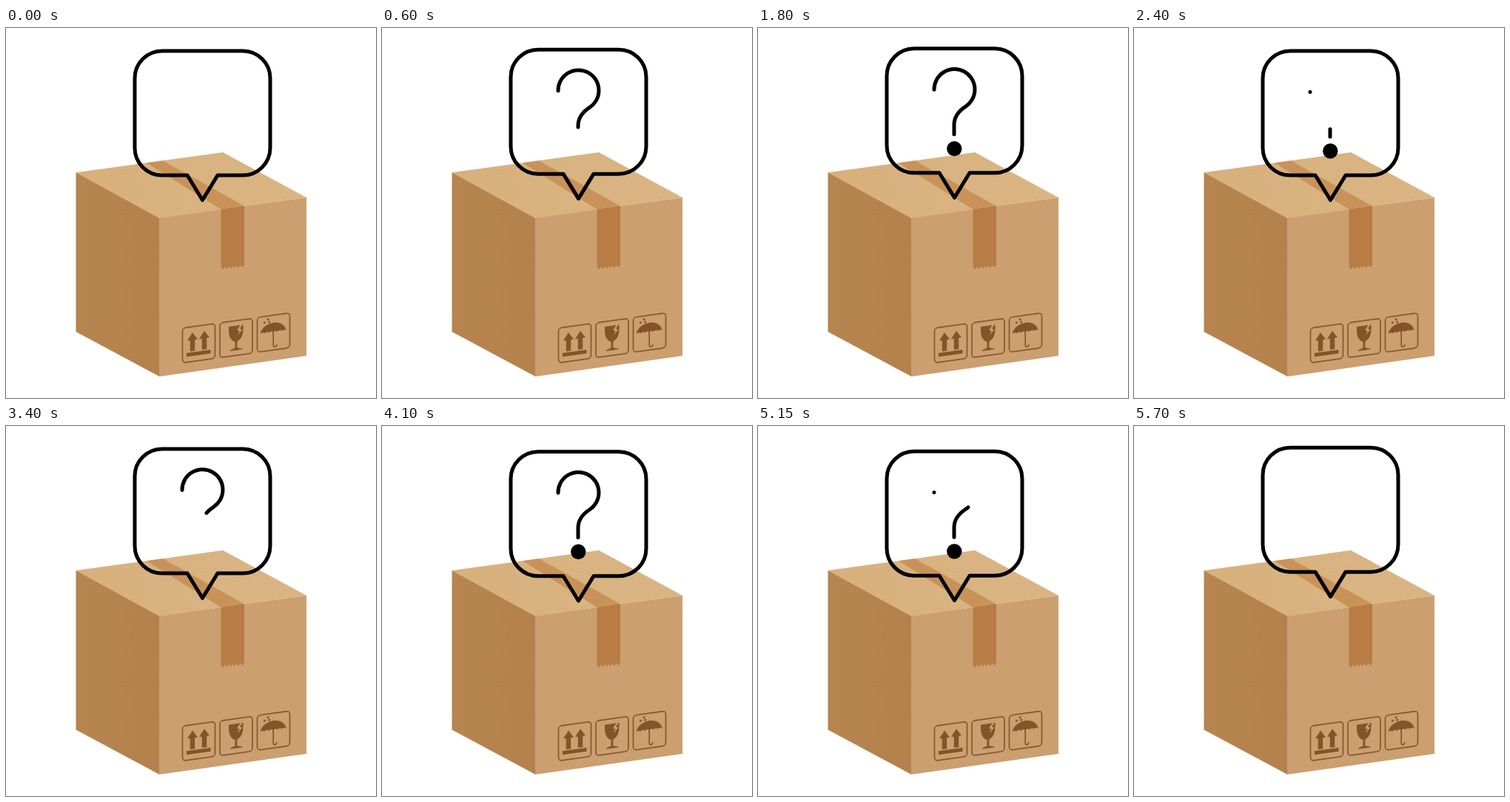
Write an HTML page that moves like this. It is 500 px wide and 500 px high and loops after 5750 ms.

```html
<!DOCTYPE html>
<html lang="en">
<head>
<meta charset="utf-8">
<title>Mystery box</title>
<style>
  html, body { margin: 0; width: 100%; height: 100%; overflow: hidden; background: #fff; }
  svg { display: block; width: 100vw; height: 100vh; }
  .ink { fill: none; stroke: #000; stroke-width: 5; stroke-linecap: round; stroke-linejoin: round; }
  .print { fill: #85532a; }
  .line { fill: none; stroke: #85532a; stroke-width: 1.6; stroke-linecap: round; }
</style>
</head>
<body>
<svg viewBox="0 0 500 500">
  <defs>
    <linearGradient id="side" x1="0" y1="0" x2="1" y2="0">
      <stop offset="0" stop-color="#b78550"/>
      <stop offset="1" stop-color="#b4814c"/>
    </linearGradient>
    <linearGradient id="lid" x1="0" y1="0" x2="1" y2="0">
      <stop offset="0" stop-color="#d7b07c"/>
      <stop offset="1" stop-color="#dab584"/>
    </linearGradient>
  </defs>

  <!-- carton -->
  <path fill="url(#side)" d="M94.5 195 207.5 256.5V471L94.5 410.5Z"/>
  <path fill="#cb9f70" d="M207 256.5 406 229V443L207 471Z"/>
  <path fill="url(#lid)" d="M94.5 195.3 293 168 406 229 207 257Z"/>
  <path fill="#c99259" d="M190 182.2 212 179.2 322 240.6 290.5 245Z"/>
  <path id="tape" fill="#b87c45"/>

  <!-- handling marks -->
  <g transform="matrix(1 -.141 0 1 238.5 405.5)">
    <rect class="line" width="44" height="47" rx="4.5"/>
    <path id="arrow" class="print" d="M13.5 8 20.5 18H16.7V33H10.3V18H6.5Z"/>
    <use href="#arrow" x="16"/>
    <rect class="print" x="5.5" y="34.5" width="32.5" height="5"/>
  </g>
  <g transform="matrix(1 -.141 0 1 289 398.5)">
    <rect class="line" width="44" height="47" rx="4.5"/>
    <path class="print" d="M12 7H31.5C32 19 30 26 23.4 28.4V36.5Q25 38 30 38.6V40H14V38.6Q19 38 20.6 36.5V28.4C14 26 11.5 19 12 7Z"/>
    <path fill="#cb9f70" d="M28 6.5 23 13.5 26.5 14.5 23.8 20.5 30.2 13 26.8 12 30.5 6.5Z"/>
  </g>
  <g transform="matrix(1 -.141 0 1 339.5 391.2)">
    <rect class="line" width="44" height="47" rx="4.5"/>
    <path class="print" d="M4 23C6 14.500 13 10 21.700 10S37.500 14.500 39.500 23Q36.500 20 33.600 23Q30.600 20 27.700 23Q24.700 20 21.700 23Q18.700 20 15.800 23Q12.800 20 9.900 23Q7 20 4 23Z"/>
    <path class="line" d="M21.700 20V40.500A2.300 2.300 0 0 0 26.300 40.500"/>
    <g class="print">
      <circle cx="14.500" cy="4.500" r="1.500"/>
      <circle cx="10" cy="8.500" r="1.500"/>
      <circle cx="16" cy="8.300" r="1.500"/>
    </g>
  </g>

  <!-- speech bubble -->
  <g id="bubble">
    <path class="ink" d="M211 31H320A37 37 0 0 1 357 68V162A37 37 0 0 1 320 199H286L265.500 232.500 245 199H211A37 37 0 0 1 174 162V68A37 37 0 0 1 211 31Z"/>
    <path id="hook" class="ink" d="M238 86.500A27.500 27.500 0 1 1 280.500 109.300C271 115.500 265 123 265 134V147"/>
    <circle id="dot" cx="265.300" cy="166.300" r="10.200"/>
  </g>
</svg>
<script>
  const LOOP = 5750, STEP = 80;
  const CYCLE = 36;            // steps per drawn and erased question mark
  const BOB = 12, SWING = 3.7; // steps per bob, pixels each way

  const $ = id => document.getElementById(id);
  const bubble = $('bubble'), hook = $('hook'), dot = $('dot');
  const length = hook.getTotalLength();

  function ramp(k, from, to) {
    const x = Math.min(1, Math.max(0, (k - from) / (to - from)));
    return x * x * (3 - 2 * x);
  }

  // torn lower edge of the tape
  let edge = 'M290.5 245 322 240.600V318';
  for (let i = 0; i <= 12; i++) {
    edge += `L${322 - i * 2.625} ${(i % 2 ? 323.500 : 320) + i * 0.250}`;
  }
  $('tape').setAttribute('d', edge + 'Z');

  function draw(time) {
    const step = Math.floor((time % LOOP) / STEP);
    const y = SWING * Math.sin(2 * Math.PI * step / BOB);
    bubble.setAttribute('transform', `translate(0 ${y.toFixed(3)})`);

    const k = step % CYCLE;
    const head = ramp(k, 0, 8.4) * length;
    const tail = ramp(k, 22, 31.5) * length;
    const shown = head - tail;
    hook.style.visibility = shown > 0.1 ? 'visible' : 'hidden';
    hook.setAttribute('stroke-dasharray', `0 ${tail} ${shown} ${length * 2}`);

    dot.setAttribute('r', 10.2 * ramp(k, 7, 11) * (1 - ramp(k, 30, 34)));
  }

  const start = performance.now();
  function tick(now) {
    draw(Math.max(0, now - start));
    requestAnimationFrame(tick);
  }
  draw(0);
  requestAnimationFrame(tick);
</script>
</body>
</html>
```
